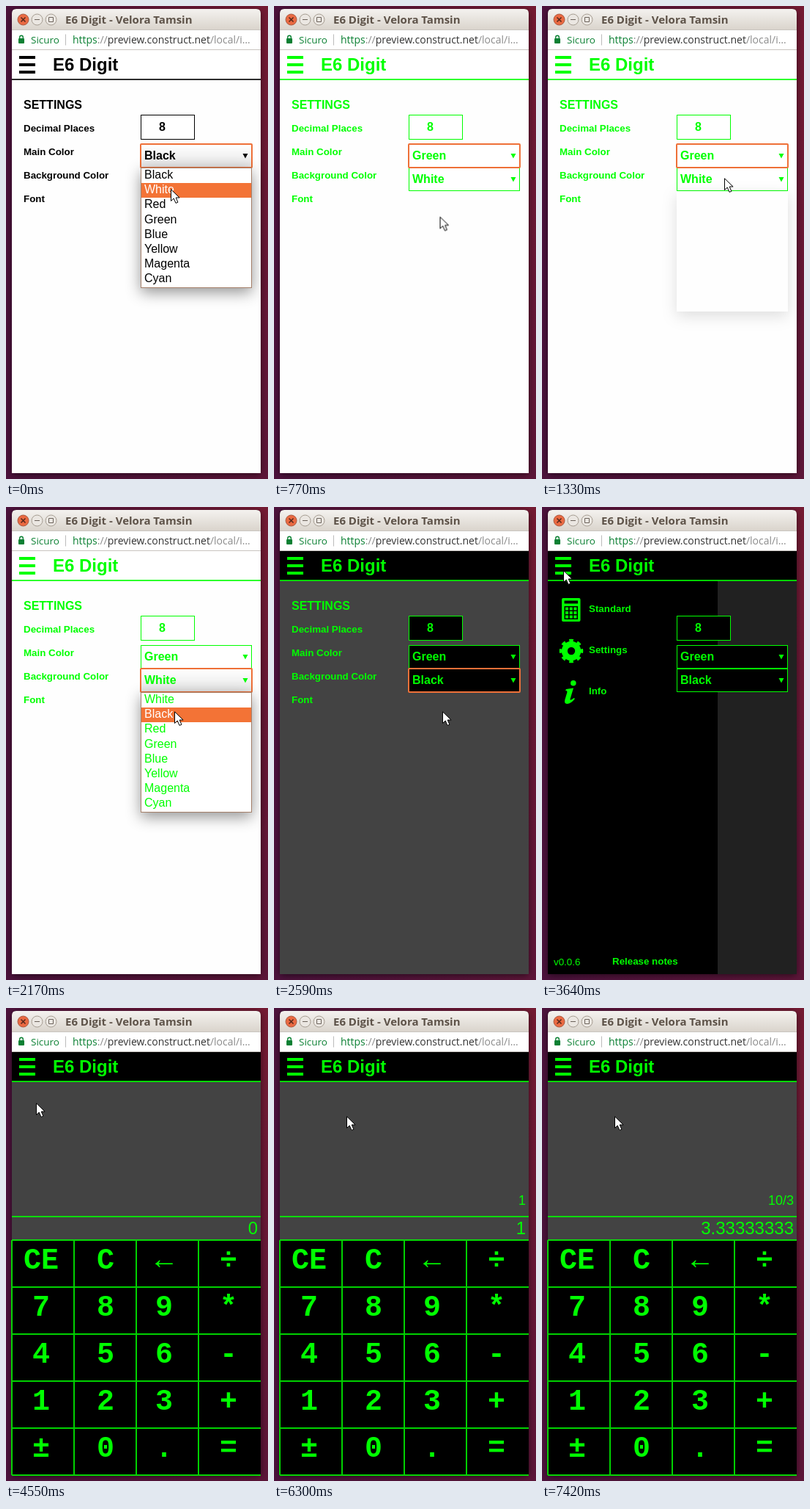
Animation of 358x644 px, one loop 8000 ms. Source, as an HTML page:

```html
<!DOCTYPE html>
<html lang="en">
<head>
<meta charset="utf-8">
<title>Calculator settings</title>
<style>
html, body { margin: 0; width: 100%; height: 100%; overflow: hidden; background: #4c123c; }
svg {
  display: block; width: 358px; height: 644px;
  font: 16px "Liberation Sans", Arial, sans-serif;
  animation: theme 8s step-end -8ms infinite;
}
.ink { fill: var(--ink); }
.paper { fill: var(--paper); }
.page { fill: var(--page); }
.rule { stroke: var(--ink); stroke-width: 2; fill: none; opacity: .82; }
.field { fill: var(--paper); stroke: var(--ink); }
.ring { fill: none; stroke: #ee7038; stroke-width: 2; opacity: .62; }
.b { font-weight: bold; }
.label { font-size: 13.333px; font-weight: bold; }
.ui { font-family: "Open Sans", "Noto Sans", sans-serif; font-size: 14px; }
.list { fill: #fff; stroke: #a5806a; filter: drop-shadow(0 6px 10px rgba(0, 0, 0, .42)); }
.ghost { fill: #fefefe; filter: drop-shadow(0 6px 10px rgba(0, 0, 0, .13)); }
.key { font: bold 40px "Liberation Mono", "Courier New", monospace; text-anchor: middle; }
.end { text-anchor: end; }
#cursor { animation: move 8s linear -8ms infinite; }

@keyframes theme {
  0% { --ink: #000; --paper: #fff; --page: #fefefe; }
  9.625% { --ink: #0f0; --paper: #fff; --page: #fefefe; }
  32.375%, to { --ink: #0f0; --paper: #000; --page: #434343; }
}
@keyframes move {
  0% { transform: translate(225px, 249px); }
  .875% { transform: translate(225px, 249px); animation-timing-function: steps(3, start); }
  3.5% { transform: translate(225px, 290px); }
  9.625% { transform: translate(225px, 290px); animation-timing-function: steps(2, start); }
  11.375% { transform: translate(228px, 283px); animation-timing-function: steps(3, start); }
  14% { transform: translate(246px, 242px); animation-timing-function: steps(2, start); }
  15.75% { transform: translate(249px, 234px); }
  21% { transform: translate(249px, 234px); animation-timing-function: steps(2, start); }
  22.75% { transform: translate(246px, 239px); animation-timing-function: steps(4, start); }
  26.25% { transform: translate(233px, 272px); animation-timing-function: steps(2, start); }
  28% { transform: translate(230px, 278px); }
  35.875% { transform: translate(230px, 278px); animation-timing-function: steps(2, start); }
  37.625% { transform: translate(210px, 259px); animation-timing-function: steps(5, start); }
  42% { transform: translate(53px, 109px); animation-timing-function: steps(2, start); }
  43.75% { transform: translate(29px, 86px); }
  50.75% { transform: translate(29px, 86px); animation-timing-function: steps(4, start); }
  54.25% { transform: translate(41px, 129px); }
  67.375% { transform: translate(41px, 129px); animation-timing-function: steps(2, start); }
  69.125% { transform: translate(72px, 115px); animation-timing-function: steps(2, start); }
  70.875%, to { transform: translate(99px, 147px); }
}
</style>
</head>
<body>
<svg viewBox="0 0 358 644">
  <defs>
    <linearGradient id="wall"><stop stop-color="#4c123c"/><stop offset="1" stop-color="#741b33"/></linearGradient>
    <linearGradient id="dusk" x2="0" y2="1"><stop stop-color="#4c123c" stop-opacity="0"/><stop offset="1" stop-color="#4c123c" stop-opacity=".6"/></linearGradient>
    <linearGradient id="bar" x2="0" y2="1"><stop stop-color="#f4f2ef"/><stop offset="1" stop-color="#d9d3cb"/></linearGradient>
    <linearGradient id="sheen" x2="0" y2="1"><stop stop-opacity="0"/><stop offset="1" stop-opacity=".1"/></linearGradient>
  </defs>

  <rect width="358" height="644" fill="url(#wall)"/>
  <rect width="358" height="644" fill="url(#dusk)"/>
  <rect x="8" y="4" width="340" height="632" rx="6" style="filter:drop-shadow(0 2px 4px rgba(0,0,0,.5))"/>

  <!-- window frame -->
  <path d="M8 33V10q0-6 6-6H342q6 0 6 6V33z" fill="url(#bar)"/>
  <g stroke="#a49b90" fill="#ebe7e2">
    <circle cx="23.5" cy="18.5" r="7.5" fill="#ea6a42" stroke="#a9583f"/>
    <circle cx="42.5" cy="18.5" r="7.5"/>
    <circle cx="61.5" cy="18.5" r="7.5"/>
  </g>
  <path d="M20.5 15.5l6 6m0-6l-6 6" stroke="#54281c" stroke-width="1.5"/>
  <path d="M39 18.5h7M58.5 15.5h6v6h-6z" stroke="#6b625a" fill="none"/>
  <text class="ui b" x="81" y="24" fill="#5d5248" style="font-size:15px">E6 Digit - Velora Tamsin</text>
  <rect x="8" y="32" width="340" height="28" fill="#fff"/>
  <path d="M8 32.5H348M8 59.5H348" stroke="#c9c5c0"/>
  <rect x="17" y="44" width="8" height="7" rx="1" fill="#0b8033"/>
  <path d="M18.7 44v-1.5a2.3 2.3 0 0 1 4.6 0V44" fill="none" stroke="#0b8033" stroke-width="1.4"/>
  <text class="ui" x="34" y="51" fill="#0b8033" style="font-size:13.5px">Sicuro</text>
  <path d="M81.500 38.500v15" stroke="#bbb"/>
  <text class="ui" x="91" y="51" fill="#8c8c8c"><tspan fill="#0b8033">https</tspan>://<tspan fill="#333">preview.construct.net</tspan>/local/i…</text>

  <!-- app page -->
  <rect class="page" x="8" y="60" width="340" height="576"/>
  <rect class="paper" x="8" y="60" width="340" height="40"/>

  <g class="ink" data-on="0 4550">
    <text class="b" x="24" y="140">SETTINGS</text>
    <g class="label">
      <text x="24" y="171">Decimal Places</text>
      <text x="24" y="203">Main Color</text>
      <text x="24" y="235">Background Color</text>
      <text x="24" y="267">Font</text>
    </g>
  </g>

  <!-- side menu -->
  <g data-on="3640 4550">
    <rect x="8" y="100" width="340" height="536" fill="#212121"/>
    <rect x="8" y="100" width="232" height="536"/>
    <g class="ink">
      <path d="M29 124H50.500q2 0 2 2V154q0 2-2 2H29q-2 0-2-2V126q0-2 2-2zM30.500 127.500v4h18.500v-4zM30.500 135v18h18.500v-18z" fill-rule="evenodd"/>
      <g id="buttons"></g>
      <g fill="none" stroke="var(--ink)">
        <circle cx="40" cy="196" r="9.200" stroke-width="8"/>
        <circle cx="40" cy="196" r="14" stroke-width="4.500" pathLength="16" stroke-dasharray="1 1" stroke-dashoffset=".5"/>
      </g>
      <circle cx="42.800" cy="239.700" r="3.800"/>
      <path d="M33 248l10-1.500-4.500 15q-.5 3 5-1.500l1.500 1q-6 7.500-11 7-4-.5-2.700-5.500l3-10q.5-3-2.300-2.500z"/>
      <g class="label">
        <text x="64" y="143">Standard</text>
        <text x="64" y="199">Settings</text>
        <text x="64" y="255">Info</text>
        <text x="96" y="623">Release notes</text>
        <text x="16" y="624" font-weight="normal" style="font-weight:normal">v0.0.6</text>
      </g>
    </g>
  </g>

  <!-- form fields -->
  <g data-on="0 3710">
    <rect class="field" x="184.500" y="148.500" width="73" height="33"/>
    <rect class="field" x="184.500" y="188.500" width="151" height="31"/>
    <rect class="field" x="184.500" y="220.500" width="151" height="31"/>
    <rect x="185" y="189" width="150" height="30" fill="url(#sheen)" data-on="0 770"/>
    <rect x="185" y="221" width="150" height="30" fill="url(#sheen)" data-on="1400 2590"/>
    <rect class="ring" x="184" y="188" width="152" height="32" rx="1" data-on="0 1400"/>
    <rect class="ring" x="184" y="220" width="152" height="32" rx="1" data-on="1400 3640"/>
    <g class="ink b">
      <text x="209" y="170">8</text>
      <text x="189" y="209" data-on="0 770">Black</text>
      <text x="189" y="209" data-on="770">Green</text>
      <text x="189" y="241" data-on="0 2590">White</text>
      <text x="189" y="241" data-on="2590">Black</text>
      <path d="M323.500 201h7l-3.500 6.500zM323.500 233h7l-3.500 6.500z"/>
    </g>
  </g>

  <g id="lists"></g>

  <!-- calculator -->
  <g data-on="4550">
    <rect class="page" x="8" y="100" width="340" height="216"/>
    <rect class="paper" x="8" y="316" width="340" height="320"/>
    <path class="rule" id="grid"/>
    <g class="ink" id="keys"></g>
    <g class="ink end" id="display"></g>
  </g>

  <!-- app header -->
  <path class="rule" d="M8 100H348"/>
  <path class="ink" d="M18 68h22v4h-22zM18 78h22v4h-22zM18 88h22v4h-22z"/>
  <text class="ink b" x="64" y="88" style="font-size:24px">E6 Digit</text>

  <path id="cursor" d="M.5 .8v15.700l3.700-3.500 2.800 6.400 2.900-1.200-2.700-6.200h4.900z" fill="#fff" stroke="#000"/>
</svg>
<script>
const LOOP = 8000, ROW = 20.2;
const $ = id => document.getElementById(id);
const range = n => [...Array(n).keys()];

// Dropdown: hot holds [row, from, to] for each highlighted row.
function dropdown(top, names, from, to, hot) {
  const row = i => `<text x="189" y="${top + 15 + ROW * i}">${names[i]}</text>`;
  const lit = ([i, a, b]) => `<g data-on="${a} ${b}" fill="#fff">
    <rect x="185" y="${Math.round(top + 1 + ROW * i)}" width="150" height="20" fill="#f37336"/>${row(i)}</g>`;
  return `<g data-on="${from} ${to}">
    <rect class="list" x="184.5" y="${top + .5}" width="151" height="163"/>
    <g class="ink">${names.map((_, i) => row(i)).join('')}</g></g>` + hot.map(lit).join('');
}

const hues = ['Red', 'Green', 'Blue', 'Yellow', 'Magenta', 'Cyan'];
$('lists').innerHTML =
  dropdown(220, ['Black', 'White', ...hues], 0, 770, [[1, 0, 70], [2, 70, 210], [3, 210, 770]]) +
  '<rect class="ghost" x="184" y="252" width="152" height="164" data-on="1330 1400"/>' +
  dropdown(252, ['White', 'Black', ...hues], 1400, 2590, [[0, 1400, 2100], [1, 2100, 2590]]);

$('buttons').innerHTML = range(9).map(i =>
  `<rect x="${32 + i % 3 * 5.7}" y="${136.5 + (i / 3 | 0) * 5.5}" width="4" height="4"/>`).join('');

$('grid').setAttribute('d', 'M8 284H348' +
  range(6).map(i => `M8 ${316 + 64 * i}H348`).join('') +
  range(4).map(i => `M${8 + 85 * i} 316V636`).join(''));

const centers = [48, 136, 216, 304];
$('keys').innerHTML = 'CE C ← ÷ 7 8 9 * 4 5 6 - 1 2 3 + ± 0 . ='.split(' ').map((k, i) =>
  `<text class="key" x="${centers[i % 4]}" y="${355 + 64 * (i / 4 | 0)}">${k}</text>`).join('');

// Typing: [from, to, expression, result]
$('display').innerHTML = [
  [4550, 6300, '', '0'], [6300, 6440, '1', '1'], [6440, 7070, '10', '10'],
  [7070, 7420, '10/', '10'], [7420, LOOP, '10/3', '3.33333333']
].map(([a, b, sum, result]) => `<g data-on="${a} ${b}">
  <text x="344" y="268" font-size="18">${sum}</text>
  <text x="344" y="308" font-size="24">${result}</text></g>`).join('');

// Show each marked part only between its two times.
for (const el of document.querySelectorAll('[data-on]')) {
  const [from, to = LOOP] = el.dataset.on.split(' ').map(Number);
  const key = (opacity, t) => ({ opacity, offset: t / LOOP, easing: 'steps(1, end)' });
  const frames = [key(1, from), key(to < LOOP ? 0 : 1, to)];
  if (from > 0) frames.unshift(key(0, 0));
  if (to < LOOP) frames.push(key(0, LOOP));
  el.animate(frames, { duration: LOOP, delay: -8, iterations: Infinity });
}
</script>
</body>
</html>
```
